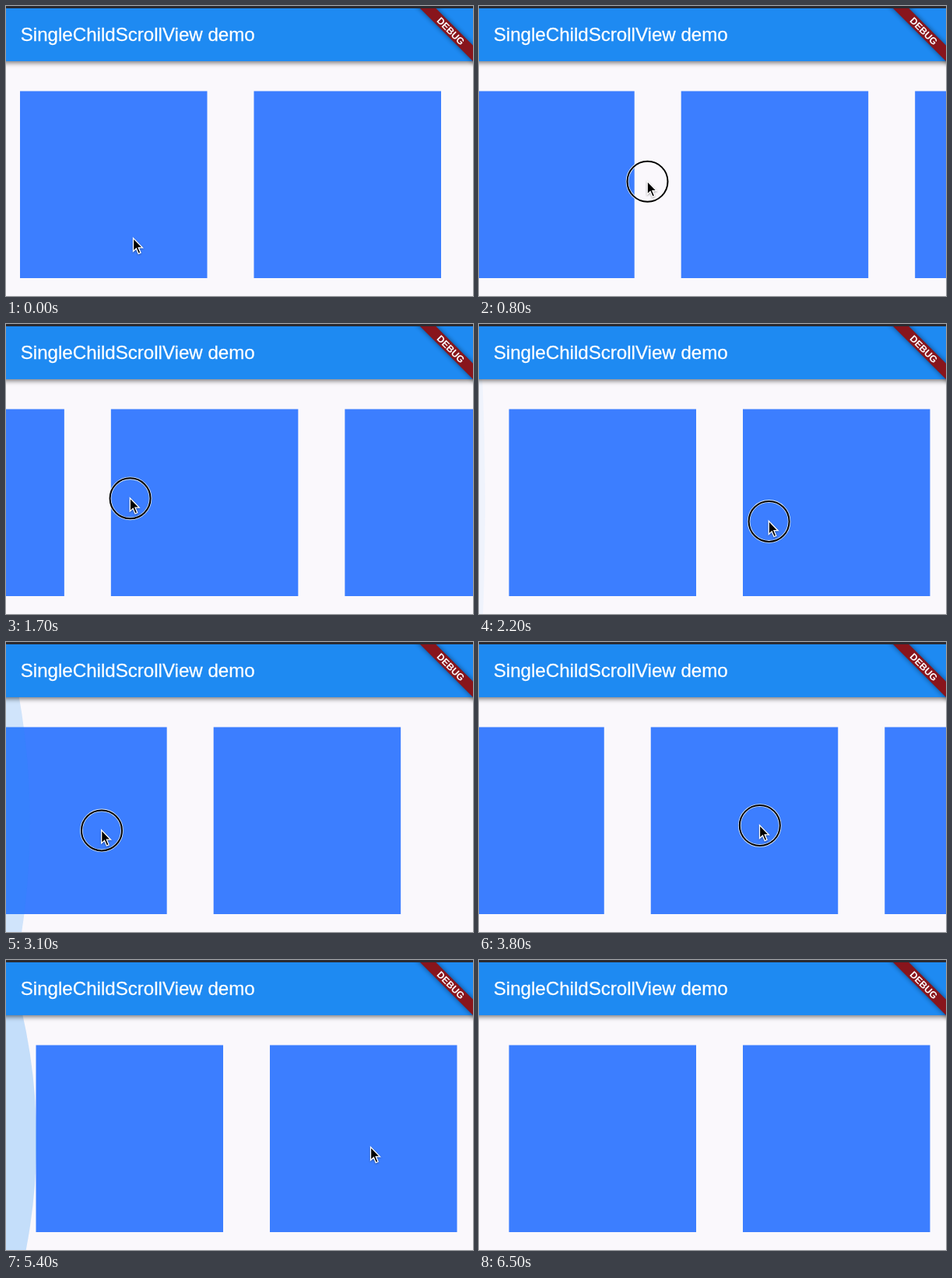
These frames come from a looping animation (600x373 px, 6600 ms). An HTML page:

```html
<!DOCTYPE html>
<html lang="en">
<head>
<meta charset="utf-8">
<title>Horizontal scroll demo</title>
<style>
  html, body { margin: 0; width: 100%; height: 100%; overflow: hidden; background: #faf8fc; }
  svg { display: block; width: 600px; height: 373px; }
  text { font-family: "Liberation Sans", Arial, sans-serif; fill: #fff; }
  #bar { filter: drop-shadow(0 2.5px 3px rgba(0, 0, 0, .55)); }
</style>
</head>
<body>
<svg viewBox="0 0 600 373">
  <defs>
    <clipPath id="window"><rect y="3" width="600" height="370"/></clipPath>
    <filter id="blur" x="-20%" y="-100%" width="140%" height="300%"><feGaussianBlur stdDeviation="3"/></filter>
  </defs>
  <rect width="600" height="373" fill="#faf8fc"/>
  <g id="row" fill="#3c7eff"></g>
  <ellipse id="leftGlow" cy="232" ry="575" fill="#1f8df3"/>
  <ellipse id="rightGlow" cy="232" ry="575" fill="#1f8df3"/>

  <rect id="bar" x="-10" width="620" height="71" fill="#1e8af2"/>
  <rect width="600" height="3" fill="#2b2b31"/>
  <text x="18.8" y="45" font-size="24.1" stroke="#fff" stroke-width=".3">SingleChildScrollView demo</text>

  <g clip-path="url(#window)">
    <g transform="translate(600 3) rotate(45)">
      <rect x="-60" y="33.7" width="120" height="14.4" opacity=".5" filter="url(#blur)"/>
      <rect x="-60" y="33.7" width="120" height="14.4" fill="#88151c"/>
      <text x=".5" y="45.2" font-size="12.3" font-weight="bold" text-anchor="middle">DEBUG</text>
    </g>
  </g>

  <g id="cursor">
    <g id="press" fill="none">
      <circle cx=".8" cy="1" r="26" stroke="#fff" stroke-width="3.6" opacity=".8"/>
      <circle cx=".8" cy="1" r="26" stroke="#000" stroke-width="2"/>
    </g>
    <path d="M.5 .5V17.5L4.4 13.9L7.2 20.6L10 19.4L7.2 12.8H12.4Z" stroke="#fff"
      stroke-width="1.3" style="filter: drop-shadow(0 1px 1px rgba(0, 0, 0, .35))"/>
  </g>
</svg>
<script>
const LOOP = 6600, FRAME = 100, TICK = 10;
const SIZE = 240.5, PITCH = 300.5, COUNT = 3;
const START = 38.5, END = -339;
const GLOW_FADE = .06, GLOW_MAX = 55;
const $ = id => document.getElementById(id);

// Turning points of the hand: time, x, y.
const turns = [
  [0, 163, 298], [500, 274.5, 230], [1300, 84, 213], [2726, 495, 270], [3200, 78, 238],
  [3800, 360, 235], [4400, 38, 218], [5400, 468, 240], [5700, 468, 240], [6400, 480, -30]
];
const presses = [[500, 1300], [1680, 3200], [3310, 4400], [4410, 5400]];

function pointer(t) {
  const i = turns.findIndex(turn => turn[0] > t);
  if (i < 0) return turns[turns.length - 1].slice(1);
  const [t0, x0, y0] = turns[i - 1], [t1, x1, y1] = turns[i];
  const u = .5 - .5 * Math.cos(Math.PI * (t - t0) / (t1 - t0));
  return [x0 + (x1 - x0) * u, y0 + (y1 - y0) * u];
}

const pressed = t => presses.some(([from, to]) => t >= from && t < to);

// A press drags the row one to one; pulling past an end feeds that end's glow.
function simulate(time) {
  let x = 18, left = 0, right = 0;
  const feed = (glow, pull) =>
    Math.min(GLOW_MAX, Math.max(0, glow - GLOW_FADE * TICK) + Math.max(0, pull));
  for (let t = 0; t < time; t += TICK) {
    const next = x + (pressed(t) ? pointer(t + TICK)[0] - pointer(t)[0] : 0);
    x = Math.min(START, Math.max(END, next));
    left = feed(left, next - x);
    right = feed(right, x - next);
  }
  return { x, left, right };
}

function drawGlow(id, depth, edge, side) {
  const rx = depth * 11.3;
  $(id).setAttribute("rx", rx);
  $(id).setAttribute("cx", edge + side * (depth - rx));
  $(id).setAttribute("opacity", depth / 160);
}

for (let i = 0; i < COUNT; i++) {
  const box = document.createElementNS("http://www.w3.org/2000/svg", "rect");
  const attrs = { x: i * PITCH, y: 109.5, width: SIZE, height: SIZE };
  for (const name in attrs) box.setAttribute(name, attrs[name]);
  $("row").append(box);
}

function draw(now) {
  const t = Math.floor(now % LOOP / FRAME) * FRAME;
  const { x, left, right } = simulate(t);
  $("row").setAttribute("transform", `translate(${x} 0)`);
  drawGlow("leftGlow", left, 0, 1);
  drawGlow("rightGlow", right, 600, -1);
  $("cursor").setAttribute("transform", `translate(${pointer(t).join(" ")})`);
  $("press").setAttribute("visibility", pressed(t) ? "visible" : "hidden");
}

const begin = performance.now();
function loop() {
  draw(performance.now() - begin);
  requestAnimationFrame(loop);
}
loop();
</script>
</body>
</html>
```
